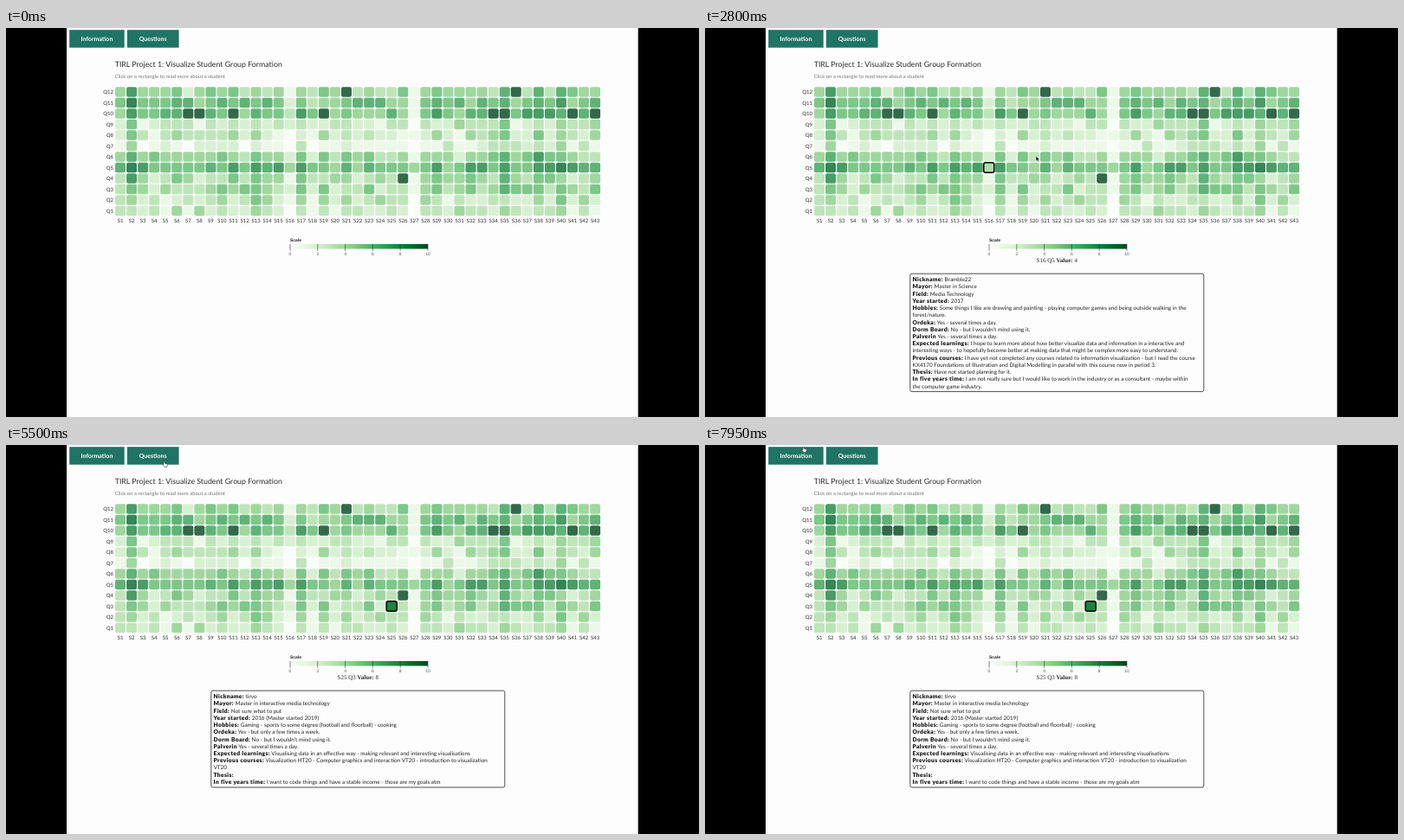
Animation, 800 px wide and 450 px high, one loop 8 s. Source, as an HTML page:

```html
<!DOCTYPE html>
<html lang="en">
<head>
<meta charset="utf-8">
<title>Student heatmap</title>
<style>
html, body { margin: 0; width: 100%; height: 100%; overflow: hidden; background: #000; }
svg { display: block; width: 800px; height: 450px; }
text { font-family: Lato, sans-serif; fill: #2b2b2b; text-rendering: geometricPrecision; }
.mid { text-anchor: middle; }
.axis { font-size: 6px; }
.tick { font: 5px "Liberation Sans", sans-serif; fill: #555; }
.scale { font-weight: 700; fill: #222; }
.btn { font-size: 7px; font-weight: 700; fill: #fff; }
.title { font-size: 8.8px; }
.hint { font-size: 5.9px; fill: #777; }
.info { font-size: 6.4px; fill: #222; }
.info .b { font-size: 6.7px; font-weight: 900; letter-spacing: .35px; fill: #111; }
.tip { font: 7px "Liberation Serif", serif; }
.tip .b { font-weight: 700; }
.head { font-size: 16.4px; font-weight: 900; fill: #111; }
.ask { font-size: 7.47px; fill: #222; }
</style>
</head>
<body>
<svg id="stage" viewBox="0 0 800 450"></svg>
<script>
const LOOP = 8000;
const QUESTIONS = 12, STUDENTS = 43;
const GREENS = ['#f7fcf5', '#e5f5e0', '#c7e9c0', '#a1d99b', '#74c476', '#41ab5d', '#238b45', '#006d2c', '#00441b'];
const stage = document.getElementById('stage');

function add(parent, tag, attrs = {}, text) {
  const el = document.createElementNS('http://www.w3.org/2000/svg', tag);
  for (const k in attrs) el.setAttribute(k, attrs[k]);
  if (text !== undefined) el.textContent = text;
  parent.appendChild(el);
  return el;
}
const rect = (parent, x, y, width, height, fill, more) =>
  add(parent, 'rect', { x, y, width, height, fill, ...more });
const label = (parent, x, y, text, cls, more) =>
  add(parent, 'text', { x, y, class: cls, ...more }, text);

function green(v) {
  const p = Math.min(1, Math.max(0, (v - 1) / 9)) * 8;
  const i = Math.min(7, Math.floor(p));
  const part = (c, k) => parseInt(c.slice(1 + 2 * k, 3 + 2 * k), 16);
  const mix = k => Math.round(part(GREENS[i], k) + (part(GREENS[i + 1], k) - part(GREENS[i], k)) * (p - i));
  return `rgb(${mix(0)},${mix(1)},${mix(2)})`;
}

// Seeded noise from -1 to 1.
function noise(a, b) {
  const n = Math.sin(a * 12.9898 + b * 78.233) * 43758.5453;
  return 2 * (n - Math.floor(n)) - 1;
}

// Answers: a mean per question, a bias per student, noise, and a few top marks.
const means = [3.5, 3.7, 4.6, 4.8, 6.8, 4.9, 2.6, 3.6, 3.6, 6.3, 5.9, 4.7];
const leaning = { 2: 2, 13: 1.5, 16: -2, 18: -1.2, 27: -2.8, 35: 1.3, 38: 1.5, 40: 1.3 };
const tops = { 4: [26], 10: [7, 8, 11, 19, 34, 35, 41, 43], 12: [21, 36] };

function answer(q, s) {
  if (tops[q]?.includes(s)) return 10;
  const bias = leaning[s] ?? .5 * noise(0, s);
  return Math.min(9, Math.round(means[q - 1] + bias + 1.3 * noise(q, s)));
}
const cellX = s => 132 + 13.05 * (s - 1);
const cellY = q => 74 + 12.5 * (QUESTIONS - q);
const cell = (parent, q, s, fill, more) =>
  rect(parent, cellX(s) - 6, cellY(q) - 5.75, 12, 11.5, fill, { rx: 2, ...more });

function buildButton(x, width, text) {
  rect(stage, x, 2.2, width, 20.5, '#1f7465');
  label(stage, x + width / 2, 15, text, 'btn mid');
}

function buildLegend() {
  const ramp = add(add(stage, 'defs'), 'linearGradient', { id: 'ramp' });
  GREENS.forEach((c, i) => add(ramp, 'stop', { offset: i / 8, 'stop-color': c }));
  label(stage, 328, 247, 'Scale', 'tick scale');
  rect(stage, 328, 249.9, 159, 5.6, 'url(#ramp)');
  for (let v = 0; v <= 10; v += 2) {
    const x = 328 + 15.9 * v;
    add(stage, 'path', { d: `M${x} 249.9V257.7`, stroke: '#333', 'stroke-width': .6 });
    label(stage, x, 262.6, v, 'tick mid');
  }
}

function buildPage() {
  rect(stage, 0, 0, 800, 450, '#000');
  rect(stage, 70, 0, 659.7, 450, '#fefdfe');
  buildButton(73.2, 63.5, 'Information');
  buildButton(139.8, 59.8, 'Questions');
  label(stage, 125.7, 45.3, 'TIRL Project 1: Visualize Student Group Formation', 'title');
  label(stage, 125.7, 58.3, 'Click on a rectangle to read more about a student', 'hint');
  for (let q = 1; q <= QUESTIONS; q++) {
    label(stage, 124, cellY(q) + 2.2, 'Q' + q, 'axis', { 'text-anchor': 'end' });
    for (let s = 1; s <= STUDENTS; s++) cell(stage, q, s, green(answer(q, s)), { opacity: .8 });
  }
  for (let s = 1; s <= STUDENTS; s++) label(stage, cellX(s), 224.6, 'S' + s, 'axis mid');
  buildLegend();
}

// A line "Label| text" has a bold label.
function rich(parent, x, y, line) {
  const el = label(parent, x, y, undefined, 'info');
  const cut = line.indexOf('|');
  if (cut >= 0) add(el, 'tspan', { class: 'b' }, line.slice(0, cut));
  add(el, 'tspan', {}, line.slice(cut + 1));
}

const picks = [
  { from: 1800, q: 5, s: 16, value: 4, text: `Nickname:| Bramble22
Mayor:| Master in Science
Field:| Media Technology
Year started:| 2017
Hobbies:| Some things I like are drawing and painting - playing computer games and being outside walking in the
forest/nature.
Ordeka:| Yes - several times a day.
Dorm Board:| No - but I wouldn't mind using it.
Palverin| Yes - several times a day.
Expected learnings:| I hope to learn more about how better visualize data and information in a interactive and
interesting ways - to hopefully become better at making data that might be complex more easy to understand.
Previous courses:| I have yet not completed any courses related to information visualization - but I read the course
KX4170 Foundations of Illustration and Digital Modelling in parallel with this course now in period 3.
Thesis:| Have not started planning for it.
In five years time:| I am not really sure but I would like to work in the industry or as a consultant - maybe within
the computer game industry.` },
  { from: 3200, q: 8, s: 27, value: 1, text: `Nickname:| Teapot12
Mayor:| Master in Science
Field:| Media Technology
Year started:| 2020
Hobbies:| I am very interested in technology - arts - and culture. I love visiting galleries or going to concerts - but I
also do sports such as Tennis in my free time.
Ordeka:| Yes - several times a day.
Dorm Board:| No - but I wouldn't mind using it.
Palverin| Yes - several times a day.
Expected learnings:| I expect to learn how to design and develop information visualization applications.
Additionally - I hope I will learn how to work with and visualize data in an engaging and interesting manner that helps
users understand the information provided.
Previous courses:| Web Design - Bachelor program - 2017
Thesis:| I thought about potential topics
In five years time:| Industry - working maybe as a Frontend Developer or UX Designer` },
  { from: 4750, q: 3, s: 25, value: 8, text: `Nickname:| tirvo
Mayor:| Master in interactive media technology
Field:| Not sure what to put
Year started:| 2016 (Master started 2019)
Hobbies:| Gaming - sports to some degree (football and floorball) - cooking
Ordeka:| Yes - but only a few times a week.
Dorm Board:| No - but I wouldn't mind using it.
Palverin| Yes - several times a day.
Expected learnings:| Visualising data in an effective way - making relevant and interesting visualisations
Previous courses:| Visualization HT20 - Computer graphics and interaction VT20 - introduction to visualization
VT20
Thesis:|
In five years time:| I want to code things and have a stable income - those are my goals atm` }
];

function buildPick({ q, s, value, text }) {
  const g = add(stage, 'g');
  const lines = text.split('\n');
  cell(g, q, s, green(value), { stroke: '#000', 'stroke-width': 1.5 });
  const tip = label(g, 382.5, 271, `S${s} Q${q} `, 'tip');
  add(tip, 'tspan', { class: 'b' }, 'Value:');
  add(tip, 'tspan', {}, ' ' + value);
  rect(g, 236.8, 284.2, 339, 8.2 * lines.length + 5.2, 'none',
    { rx: 2, stroke: '#222', 'stroke-width': .8 });
  lines.forEach((line, i) => rich(g, 239.5, 293.2 + 8.22 * i, line));
  return g;
}

const skills = ['Information Visualization', 'statistical', 'mathematics', 'drawing and artistic',
  'computer usage', 'programming', 'computer graphics programming/',
  'human-computer interaction/programming', 'user experience evaluation',
  'communication', 'collaboration', 'code repository'];

function buildModal() {
  const g = add(stage, 'g');
  rect(g, 70, 0, 660, 450, '#000', { opacity: .75 });
  rect(g, 289.5, 116, 233.5, 276.5, '#fefdfe', { rx: 11 });
  label(g, 298, 149.8, 'Questions:', 'head');
  let y = 170.4;
  skills.forEach((skill, i) => {
    const text = `Q${i + 1} = How would you rate your ${skill} skills?`;
    text.split('/').forEach((part, k) => {
      if (k) y += 9.1;
      label(g, 298, y, part.trim(), 'ask');
    });
    y += 16.85;
  });
  return g;
}

function buildCursor() {
  const g = add(stage, 'g');
  const arrow = add(g, 'path', { d: 'M0 0V6L1.4 4.8 2.3 6.8 3.3 6.4 2.4 4.4H4.3Z',
    fill: '#000', stroke: '#fff', 'stroke-width': .5 });
  const hand = add(g, 'path', { d: 'M0 .6Q.7-.4 1.4 .6V2.3L4 3Q4.6 3.4 4.3 4.4L3.7 6.4H.9L-1.3 3.8Q-1.2 3 0 3.6Z',
    fill: '#fff', stroke: '#111', 'stroke-width': .5 });
  return { g, arrow, hand };
}

// Pointer stops: arrival time and place; each move eases in over MOVE ms.
const MOVE = 500;
const stops = [[1700, 331, 158], [3100, 475, 130], [4600, 447, 187], [5450, 182, 19],
  [6100, 194, 23], [7350, 347, 61], [7900, 113, 2]];

function pointerAt(t) {
  let [, x, y] = stops[0];
  for (const [at, toX, toY] of stops.slice(1)) {
    const p = Math.min(1, Math.max(0, 1 - (at - t) / MOVE));
    const e = p * p * (3 - 2 * p);
    x += (toX - x) * e;
    y += (toY - y) * e;
  }
  return [x, y];
}

const show = (el, on) => { el.style.display = on ? '' : 'none'; };

buildPage();
const panels = picks.map(buildPick);
const modal = buildModal();
const cursor = buildCursor();

function update(t) {
  panels.forEach((g, i) => {
    const end = picks[i + 1]?.from ?? LOOP;
    show(g, t >= picks[i].from && t < end);
  });
  const open = t >= 5750 && t < 7500;
  const [x, y] = pointerAt(t);
  const hand = open || (y < 22 && x < 200);
  show(modal, open);
  show(cursor.g, t >= stops[0][0]);
  show(cursor.hand, hand);
  show(cursor.arrow, !hand);
  cursor.g.setAttribute('transform', `translate(${x} ${y})`);
}

const start = performance.now();
function loop() {
  update((performance.now() - start) % LOOP);
  requestAnimationFrame(loop);
}
loop();
</script>
</body>
</html>
```
